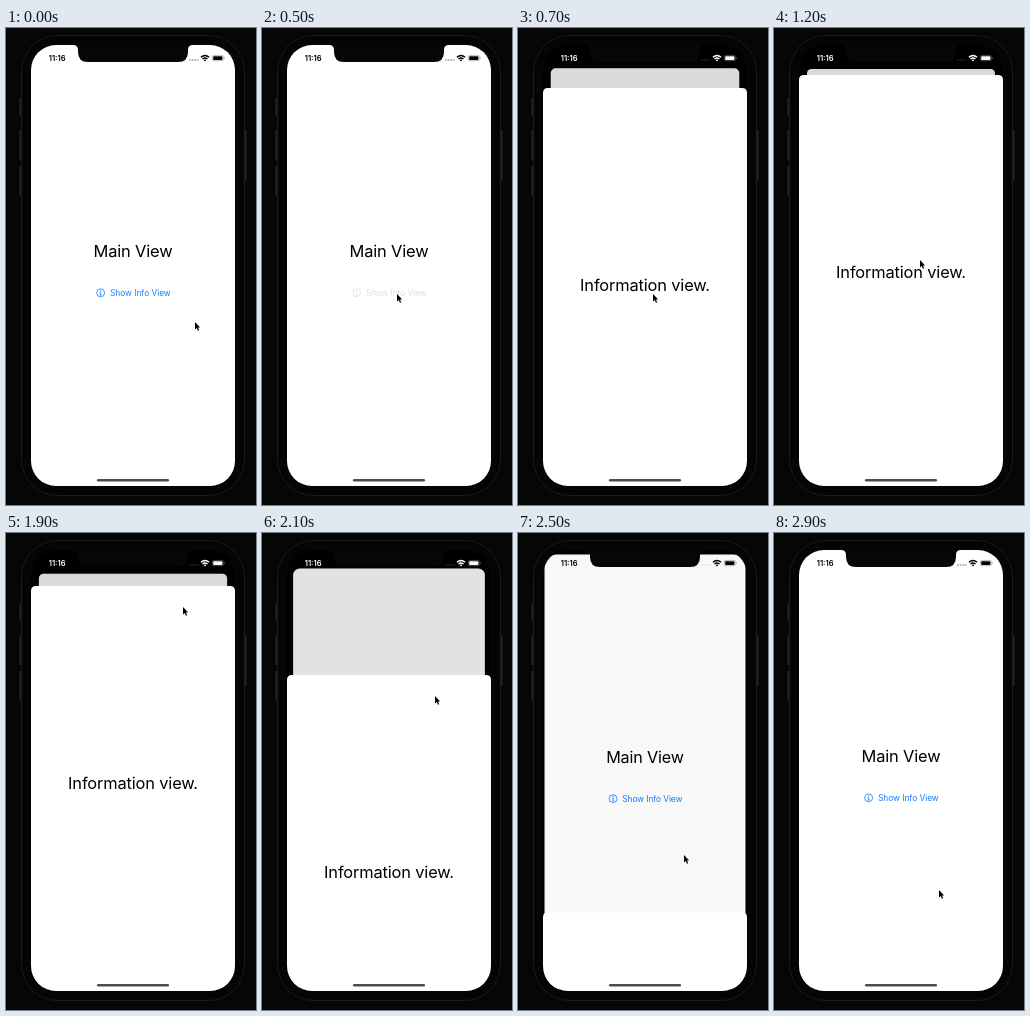
Recreate the animation shown at these times as an HTML page. Size 250 by 477 pixels, loop 3000 ms.

```html
<!DOCTYPE html>
<html lang="en">
<head>
<meta charset="utf-8">
<title>Sheet presentation</title>
<style>
  html, body { margin: 0; width: 100%; height: 100%; overflow: hidden; background: #060606; }
  svg { display: block; width: 250px; height: 477px; }
  text { font-family: Inter, Roboto, sans-serif; }
  .title { font-size: 16.4px; text-anchor: middle; letter-spacing: -.15px; }
  .label { font-size: 8.4px; letter-spacing: -.04px; }
  .clock { font-size: 7.6px; font-weight: 600; }
</style>
</head>
<body>
<svg viewBox="0 0 250 477">
  <defs>
    <clipPath id="screen"><rect x="25" y="17" width="204" height="441" rx="25"/></clipPath>
  </defs>

  <!-- Phone body and side buttons -->
  <g fill="#050505" stroke="#1b1b1b">
    <rect x="15.5" y="7.5" width="223" height="460" rx="36"/>
    <path d="M14.5 70v18M14.5 102v30M14.5 138v30M239.5 102v51" stroke="#222" stroke-width="2"/>
  </g>

  <g clip-path="url(#screen)">
    <rect x="25" y="17" width="204" height="441"/>
    <g id="card">
      <rect id="cardBack" x="25" y="17" width="204" height="441" fill="#fff"/>
      <text class="title" x="127" y="228.5">Main View</text>
      <g id="button" fill="#167efb">
        <circle cx="94.6" cy="264.8" r="4" fill="none" stroke="#167efb" stroke-width=".8"/>
        <path d="M94 262.2h1.2v1.1H94zM93.6 264.2h1.5v2.6h.7v.7h-2.3v-.7h.8v-1.9h-.7z"/>
        <text class="label" x="104" y="268">Show Info View</text>
      </g>
      <rect id="dim" x="25" y="17" width="204" height="441"/>
    </g>

    <path d="M67 16h120v1q-5 0-5 5v2q0 10-10 10H82q-10 0-10-10v-2q0-5-5-5z" fill="#060606"/>

    <g id="status">
      <text class="clock" x="42.7" y="33">11:16</text>
      <path d="M183 32h1.6M185.6 32h1.6M188.2 32h1.6M190.8 32h1.6" stroke="#999" stroke-width="1.3"/>
      <g fill="none" stroke="currentColor" stroke-width="1.4">
        <path d="M194.9 29.2q4.1-3.4 8.2 0M196.5 31q2.5-2 5 0"/>
      </g>
      <path d="M197.6 32q1.4-1.1 2.8 0l-1.4 1.5z"/>
      <rect x="206.3" y="27.4" width="11" height="5.4" rx="1.5" fill="none" stroke="currentColor" stroke-opacity=".45" stroke-width=".6"/>
      <rect x="207.2" y="28.2" width="9.2" height="3.8" rx=".8"/>
      <path d="M218 29q1.2 1 0 2.2z" opacity=".6"/>
    </g>

    <g id="sheet">
      <path d="M25 441V5q0-5 5-5H224q5 0 5 5V441z" fill="#fff"/>
      <text class="title" x="127" y="203">Information view.</text>
    </g>
    <rect x="91" y="451" width="72" height="2.6" rx="1.3" fill="#4c4c4c"/>
  </g>

  <path id="cursor" d="M0 0V7.4L1.7 5.9 3 8.8 4.2 8.3 2.9 5.5H5.2z" stroke="#fff" stroke-width=".5" paint-order="stroke"/>
</svg>

<script>
const LOOP = 3000, STEP = 100;
const OPEN_TOP = 47, CLOSED_TOP = 458;
const PRESS = 500, DRAG = 1800, RELEASE = 2400, GRIP = 68;

// Cursor waypoints: time, x, y
const path = [
  [0, 189, 294], [100, 150, 279], [200, 98, 262], [300, 135, 266], [1100, 135, 266],
  [1200, 146, 232], [1400, 168, 130], [1500, 175, 88], [1600, 178, 65], [1700, 178, 54],
  [1800, 178, 61], [1900, 177, 74], [2100, 173, 163], [2300, 168, 244],
  [2400, 167, 285], [2500, 166, 322], [2700, 165, 357], [3000, 165, 357]
];

const el = id => document.getElementById(id);
const [card, cardBack, button, dim, status, sheet, cursor] =
  ["card", "cardBack", "button", "dim", "status", "sheet", "cursor"].map(el);
const mix = (a, b, k) => a + (b - a) * k;

function cursorAt(t) {
  const i = path.findIndex(p => p[0] > t);
  const [t0, x0, y0] = path[i - 1], [t1, x1, y1] = path[i];
  const k = (t - t0) / (t1 - t0);
  return [mix(x0, x1, k), mix(y0, y1, k)];
}

// Remaining distance of a critically damped spring
function spring(ms, rate) {
  const u = ms / 1000 * rate;
  return (1 + u) * Math.exp(-u);
}

const dragTop = t => OPEN_TOP + Math.max(0, cursorAt(t)[1] - GRIP);

function sheetTop(t) {
  if (t <= PRESS || t >= 2900) return CLOSED_TOP;
  if (t < 1000) return mix(OPEN_TOP, CLOSED_TOP, spring(t - PRESS, 26.5));
  if (t < DRAG) return OPEN_TOP;
  if (t <= RELEASE) return dragTop(t);
  return mix(CLOSED_TOP, dragTop(RELEASE), spring(t - RELEASE, 20));
}

function draw(t) {
  const top = sheetTop(t);
  const shown = (CLOSED_TOP - top) / (CLOSED_TOP - OPEN_TOP);
  const scale = mix(1, 188 / 204, shown);
  const moving = top < CLOSED_TOP;

  sheet.setAttribute("transform", `translate(0 ${top})`);
  card.setAttribute("transform",
    `translate(127 ${mix(17, 41, shown)}) scale(${scale}) translate(-127 -17)`);
  for (const r of [cardBack, dim]) r.setAttribute("rx", moving ? mix(14, 5, shown) : 0);
  dim.setAttribute("opacity", .15 * shown);

  const pressed = t === PRESS;
  button.setAttribute("opacity", pressed ? .22 : 1);
  button.style.filter = pressed ? "grayscale(.8)" : "none";

  const ink = t > PRESS && t <= RELEASE ? "#fff" : "#000";
  status.setAttribute("fill", ink);
  status.setAttribute("color", ink);
  status.querySelector("path").setAttribute("opacity", moving ? .25 : 1);

  cursor.setAttribute("transform", `translate(${cursorAt(t)})`);
}

function tick(now) {
  draw(Math.floor(now % LOOP / STEP) * STEP);
  requestAnimationFrame(tick);
}
draw(0);
requestAnimationFrame(tick);
</script>
</body>
</html>
```
